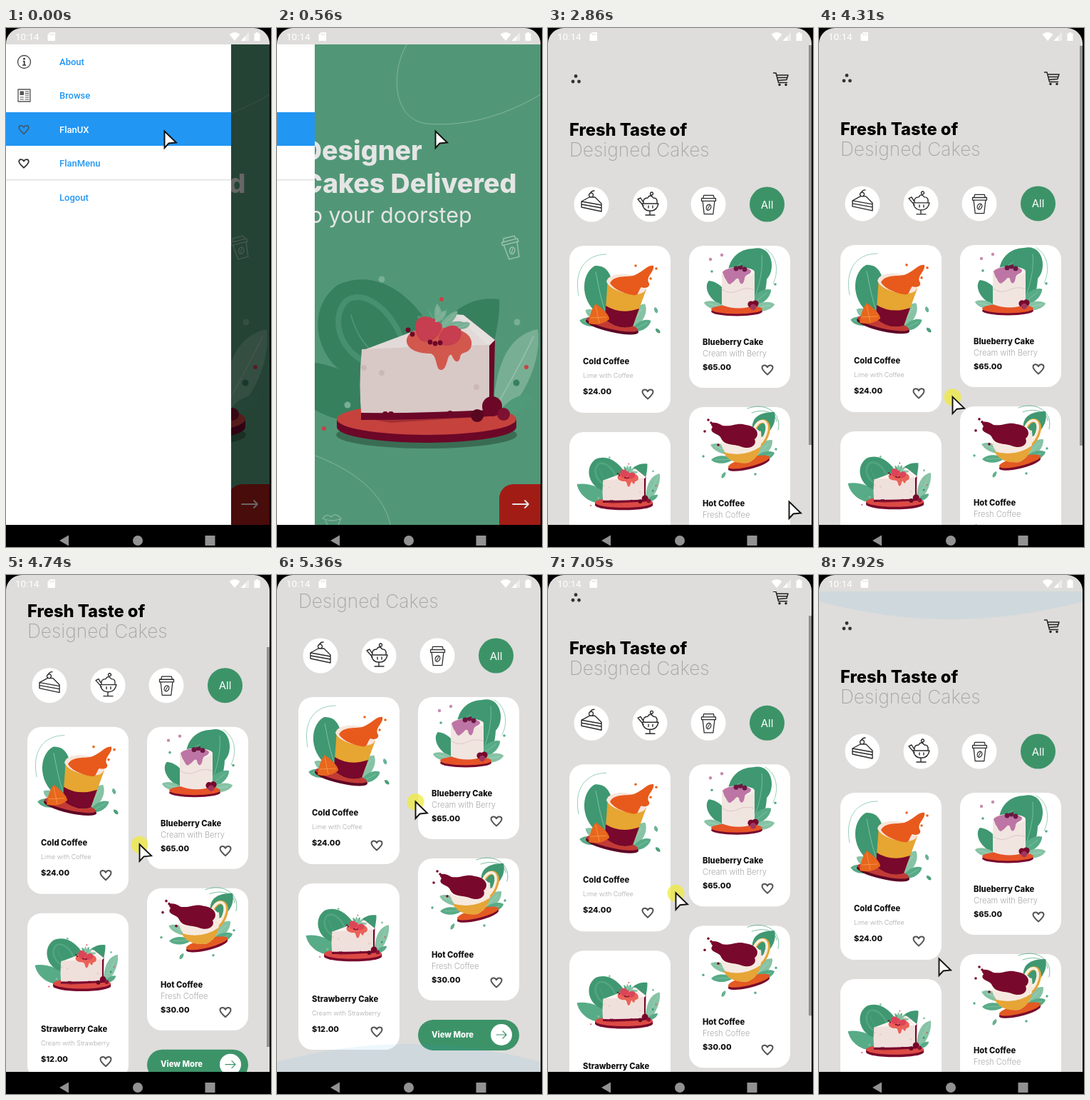
Recreate the animation shown at these times as an HTML page with a canvas. Size 372x727 px, loop 8000 ms.

```html
<!DOCTYPE html>
<html lang="en">
<head>
<meta charset="utf-8">
<title>Cake shop app</title>
<style>
html, body { margin: 0; width: 100%; height: 100%; overflow: hidden; background: #000; }
canvas { display: block; width: 372px; height: 727px; }
</style>
</head>
<body>
<canvas id="stage"></canvas>
<script>
const W = 372, H = 727, SCREEN = 370, TOP = 23, BOTTOM = 696, LOOP = 8000;
const canvas = document.getElementById('stage');
const g = canvas.getContext('2d');
const dpr = window.devicePixelRatio || 1;
canvas.width = W * dpr;
canvas.height = H * dpr;

const PAPER = '#dedddb', GREEN = '#3d9368', BLUE = '#2196f3', MAROON = '#78082c';
const LEAF = '#3f9871', MID = '#58ab87', PALE = '#86c3a5';
const GEO = 'Inter, "Open Sans", sans-serif', UI = 'Roboto, sans-serif';

// Drawing helpers
const fill = (d, c) => { g.fillStyle = c; g.fill(new Path2D(d)); };
const line = (d, c, w = 1) => {
  g.strokeStyle = c; g.lineWidth = w; g.lineCap = g.lineJoin = 'round';
  g.stroke(new Path2D(d));
};
const rect = (x, y, w, h, c) => { g.fillStyle = c; g.fillRect(x, y, w, h); };
const round = (x, y, w, h, r, c) => {
  g.fillStyle = c; g.beginPath(); g.roundRect(x, y, w, h, r); g.fill();
};
const oval = (x, y, rx, ry, c, rot = 0) => {
  g.fillStyle = c; g.beginPath(); g.ellipse(x, y, rx, ry, rot, 0, 7); g.fill();
};
const dot = (x, y, r, c) => oval(x, y, r, r, c);
const dots = (c, r, ...pts) => pts.forEach(([x, y]) => dot(x, y, r, c));
const text = (s, x, y, size, c, weight = 400, family = GEO, align = 'left') => {
  g.font = `${weight} ${size}px ${family}`;
  g.textAlign = align; g.fillStyle = c; g.fillText(s, x, y);
};
const at = (x, y, draw, scale = 1, rot = 0) => {
  g.save(); g.translate(x, y); g.rotate(rot); g.scale(scale, scale); draw(); g.restore();
};
const leaf = (x, y, len, wide, deg, c) => at(x, y, () => {
  fill(`M0 0C${len * .25} ${-wide} ${len * .8} ${-wide} ${len} 0C${len * .8} ${wide} ${len * .25} ${wide} 0 0Z`, c);
  line(`M0 0H${len * .8}`, 'rgba(255,255,255,.3)', .7);
}, 1, deg * Math.PI / 180);

// Timing helpers
const clamp = v => Math.min(1, Math.max(0, v));
const span = (t, a, b) => clamp((t - a) / (b - a));
const smooth = u => u * u * (3 - 2 * u);
const track = (t, keys, ease = u => u) => {
  let i = 0;
  while (i < keys.length - 2 && t >= keys[i + 1][0]) i++;
  const [a, b] = [keys[i], keys[i + 1]], u = ease(span(t, a[0], b[0]));
  return a.slice(1).map((v, k) => v + (b[k + 1] - v) * u);
};

const heart = (x, y, s = 1, c = '#555', w = 2) => at(x, y, () =>
  line('M0 6.5C-4 3-7.5 0-7.5-3.2C-7.5-7.3-2-7.8 0-3.8C2-7.8 7.5-7.3 7.5-3.2C7.5 0 4 3 0 6.5Z', c, w), s);

const arrow = (x, y, half, c, w) => line(`M${x - half} ${y}H${x + half}m-5-5l5 5l-5 5`, c, w);

// Illustrations
function slice(onGreen) {
  const deep = onGreen ? '#3c8e69' : LEAF;
  fill('M130 548C70 560 15 520 5 468C50 460 110 480 140 510Z', onGreen ? deep : MID);
  fill('M150 500C60 500 30 400 85 360C140 335 190 375 215 420L215 500Z', deep);
  line('M135 472C92 460 72 410 97 382C122 366 155 392 172 428', 'rgba(110,185,150,.4)', 8);
  line('M104 402C110 425 122 445 140 458', 'rgba(160,210,185,.35)', 1.5);
  fill('M235 425C240 395 275 375 312 380C314 405 304 440 298 480L240 470Z', deep);
  fill('M304 520C310 470 325 430 366 422C372 460 350 520 312 545Z', PALE);
  line('M308 530C325 500 345 465 360 432', 'rgba(255,255,255,.35)', 1.3);
  fill('M308 545C320 520 345 510 358 515C356 530 335 545 312 548Z', MID);
  if (onGreen) oval(210, 570, 127, 19, 'rgba(40,75,55,.5)');
  oval(210, 559, 126, 22, MAROON);
  rect(84, 548, 252, 11, MAROON);
  oval(210, 548, 126, 22, '#dc4a44');
  fill('M118 546L160 553L310 543L298 534Z', '#b7343a');
  fill('M250 403L262 402L306 437L304 528L297 540Z', MAROON);
  fill('M119 452L252 402L298 446Z', '#fbf3f0');
  fill('M250 401L262 402L306 437L297 446Z', '#fffaf7');
  fill('M119 450Q200 446 298 444V539L119 549Q114 500 119 450Z', '#f0e0dc');
  fill('M118 539Q200 540 298 535V544Q210 549 118 549Z', MAROON);
  dots('#e3cdc9', 4, [147, 483], [122, 476], [280, 503]);
  dots(MAROON, 4, [152, 541], [160, 541], [243, 540]);
  for (const a of [-150, -120, -95, -70, -45, -15]) leaf(228, 422, 36, 7, a, a % 2 ? PALE : MID);
  fill('M182 440C180 422 210 418 235 420C262 420 278 432 272 448C266 458 258 452 257 462C254 472 248 466 245 458C238 456 240 478 231 479C222 480 226 460 216 456C200 456 185 452 182 440Z', '#ea6257');
  fill('M196 410C203 400 220 404 232 416C230 432 215 444 202 438C194 430 192 418 196 410Z', '#dc4558');
  fill('M228 430C235 414 252 414 258 422C262 436 250 446 236 445C228 444 225 438 228 430Z', '#dc4558');
  leaf(222, 412, 22, 6, -45, PALE);
  leaf(254, 420, 18, 6, -20, PALE);
  dots(MAROON, 3.4, [184, 423], [190, 429], [215, 440], [222, 442], [229, 441]);
  dot(302, 530, 14, MAROON); dot(281, 543, 9, '#620824'); dot(318, 541, 9, '#8c1236');
  dots('#e0484f', 3, [231, 380], [350, 475], [66, 561]);
  dots(PALE, 4.5, [147, 352], [99, 528], [337, 412]);
  dot(336, 497, 4.5, deep);
}

function coldCoffee() {
  line('M43 375C36 340 52 317 82 317', '#7fc3a2', .8);
  fill('M76 404C45 388 44 345 66 333C92 331 94 365 90 400Z', LEAF);
  line('M80 396C72 372 70 355 67 342', '#8dccb0', .8);
  leaf(82, 412, 34, 9, -150, PALE);
  leaf(74, 414, 30, 8, -172, MID);
  leaf(114, 422, 42, 12, -58, PALE);
  leaf(118, 424, 30, 8, -28, MID);
  oval(90, 418, 38, 8, '#5d0626', .22);
  oval(90, 415, 37, 7, '#c23a35', .22);
  fill('M84 350L138 366L119 418Q98 424 80 408Z', '#e7a531');
  fill('M81 389Q102 402 128 393L119 418Q98 424 80 408Z', MAROON);
  fill('M82 355Q86 343 111 345Q138 350 138 365Q134 376 111 372Q86 366 82 355Z', '#f8e5dc');
  fill('M87 357C94 345 112 350 122 346C133 342 140 331 148 333C150 341 138 347 141 356C145 361 139 366 131 363C126 368 128 376 119 374C105 372 90 364 87 357Z', '#e75a1c');
  fill('M67 386Q86 400 86 408Q74 418 57 414Q59 396 67 386Z', '#e8661d');
  line('M67 390L72 413M60 406L82 405', '#f4a04a', .8);
  dots('#e8661d', 1.8, [152, 337], [144, 351], [123, 333]);
  leaf(150, 391, 9, 3, 70, MID);
  leaf(151, 421, 9, 3, 45, LEAF);
}

function blueberryCake() {
  line('M305 309C321 318 325 340 316 358', '#7fc3a2', .8);
  fill('M263 390C240 340 257 310 288 309C316 303 320 340 307 352C306 372 300 390 284 396Z', LEAF);
  line('M286 388C298 360 302 336 300 318', '#83c7a9', .8);
  fill('M250 392C222 381 219 360 226 354C242 356 254 370 256 392Z', LEAF);
  leaf(248, 392, 30, 7, -166, PALE);
  leaf(282, 390, 39, 10, -37, MID);
  leaf(285, 394, 34, 8, -12, PALE);
  oval(265, 397, 36, 6.5, MAROON);
  oval(265, 394, 36, 6.5, '#e65327');
  fill('M244 342V388Q268 397 290 388V342Z', '#f1e5e0');
  line('M244 366Q255 374 267 368T290 367', '#ddc8c6', 1);
  oval(267, 342, 23, 7, '#f9f0ed');
  fill('M245 342C251 334 278 333 285 340C285 346 278 344 276 350C275 361 269 361 268 352C264 348 263 355 258 357C253 363 251 353 248 350Z', '#bd75a5');
  dots('#6b1740', 3.4, [264, 337], [270, 335], [276, 338]);
  leaf(266, 333, 9, 3, -30, LEAF);
  dots(MAROON, 4.6, [285, 387], [291, 386]);
  dot(288, 391, 4.2, '#a03660');
  dots('#c88bad', 2.2, [228, 324], [244, 318]);
  dots(MID, 1.8, [319, 359], [230, 341]);
}

function hotCoffee() {
  line('M280 533C306 523 329 540 323 563', '#5aae88', .8);
  line('M286 539C306 532 320 540 321 551', '#5aae88', .8);
  fill('M287 566C284 546 296 538 318 538C322 555 310 570 294 576Z', LEAF);
  leaf(262, 596, 36, 8, -160, PALE);
  leaf(260, 604, 31, 7, 178, MID);
  leaf(288, 604, 38, 10, -45, PALE);
  leaf(288, 606, 32, 8, -20, MID);
  oval(282, 611, 30, 7, MAROON, -.24);
  oval(282, 608, 30, 6.5, '#e35a22', -.24);
  line('M290 562C296 546 311 548 309 564C306 578 298 586 288 589', '#e6a536', 5.5);
  line('M289 562C296 546 309 548 307 563C304 577 297 584 288 587', '#fbeee2', 3.6);
  fill('M240 574Q263 556 299 565Q303 599 281 609Q250 613 240 574Z', '#f6e9df');
  fill('M246 594Q274 603 299 586Q295 603 281 609Q256 612 246 594Z', '#e6a536');
  oval(268, 571, 29, 12, '#fffaf3', -.17);
  fill('M231 559C224 551 236 551 245 557C260 559 264 552 278 556C294 558 298 570 290 576C294 584 284 592 270 586C256 582 249 585 243 575C242 568 224 568 231 559Z', MAROON);
  dots(MAROON, 1.8, [225, 549], [229, 553], [220, 565], [239, 584]);
  leaf(249, 622, 10, 3, 120, MID);
  dots(MID, 1.7, [218, 600], [320, 590], [291, 625]);
}

const paperCup = (c, w) => {
  line('M-9.5-8H9.5V-4.5H-9.5ZM-7.5-8L-6.5-12H6.5L7.5-8M-8-4.5L-6 13H6L8-4.5', c, w);
  g.beginPath(); g.ellipse(0, 4, 3, 4, .4, 0, 7); g.stroke();
  line('M-1.5 6.5L1.5 1.5', c, w * .8);
};

// Screens
function welcome() {
  rect(0, TOP, SCREEN, BOTTOM - TOP, '#5aa885');
  const thin = 'rgba(215,238,226,.45)';
  line('M182 23C160 60 161 128 210 134C270 139 325 120 370 93', thin);
  line('M0 583C100 606 150 650 159 696', thin);
  at(329, 307, () => paperCup('rgba(225,242,232,.65)', 1.2), 1.2, -.25);
  at(78, 691, () => line('M-14-4Q-8-12-2-6Q4-13 12-4M-14-4Q0 2 12-4L7 7M-10-1L-6 8', thin, 1.3));
  text('Designer', 36, 185, 37.5, '#fff', 800);
  text('Cakes Delivered', 36, 231, 37.5, '#fff', 800);
  text('to your doorstep', 36, 273, 30.4, '#fff');
  slice(true);
  round(312, 639, 58, 57, [20, 0, 0, 0], '#b41f19');
  arrow(342, 667, 11, '#fff', 1.8);
}

function card(x, y, h, name, note, price, big) {
  round(x, y, 142, h, 20, '#fff');
  const [ny, sy, py] = big ? [166, 185, 208] : [139, 155, 174];
  text(name, x + 19, y + ny, 11.2, '#111', 800);
  text(note, x + 19, y + sy, big ? 9 : 11.1, '#a9a9a9', 300);
  text(price, x + 19, y + py, 11, '#111', 800);
  heart(x + 110, y + py, 1);
}

function shop(scroll) {
  rect(0, TOP, SCREEN, BOTTOM - TOP, PAPER);
  g.save();
  g.translate(0, -scroll);
  dots('#333', 2.4, [39, 67.5], [35, 75], [43.5, 75]);
  line('M316.5 63H320L323.5 76.5H335.5M321 66H337L335 72.5L322.5 73.5M322 69.5H336', '#222', 1.5);
  dots('#222', 1.7, [325, 79.5], [334, 79.5]);
  text('Fresh Taste of', 30, 151, 23.7, '#000', 800);
  text('Designed Cakes', 30, 180, 26.3, '#a6a6a6', 200);

  [61, 143, 225].forEach(x => dot(x, 247, 24.5, '#fff'));
  dot(307.5, 247, 24.5, GREEN);
  text('All', 307.5, 252.5, 15, '#fff', 400, GEO, 'center');
  const ink = '#2b2b2b';
  at(61, 246, () => line('M-14-3L-3-9H5L14 0V11L-14 5ZM-14-3L14 2M-14 1L14 6M-1-9A3 3 0 1 1 0-9M-2-14Q0-18 4-18', ink, 1.4));
  at(143, 247, () => line('M-11-1H12Q10 8 3 9H-2Q-9 8-11-1ZM0 9V14M-6 15H7M-9-2Q-10-9-3-9Q0-15 5-9Q11-9 10-2M-16-6L-9 2M-17-7L-13-9L-10-4M-2 2V5M4 2V5M2-13A2 2 0 1 1 3-13', ink, 1.4));
  at(225.5, 247, () => paperCup(ink, 1.2), 1.05);

  card(30, 305, 234, 'Cold Coffee', 'Lime with Coffee', '$24.00', true);
  coldCoffee();
  card(198, 305, 199, 'Blueberry Cake', 'Cream with Berry', '$65.00');
  blueberryCake();
  card(30, 566, 233, 'Strawberry Cake', 'Cream with Strawberry', '$12.00', true);
  at(66, 666, () => { g.translate(-84, -552); slice(false); }, .322);
  card(198, 531, 199, 'Hot Coffee', 'Fresh Coffee', '$30.00');
  hotCoffee();
  round(198, 757, 142, 43, 21.5, GREEN);
  text('View More', 217, 781.5, 11.2, '#fff', 800);
  dot(315, 778, 15, '#fff');
  arrow(315, 778, 7, GREEN, 1.2);
  g.restore();
}

function drawer() {
  rect(0, TOP, 316, BOTTOM - TOP, '#fff');
  rect(0, 118, 316, 47, BLUE);
  rect(0, 212, 316, 1.5, '#e2e2e2');
  ['About', 'Browse', 'FlanUX', 'FlanMenu', 'Logout'].forEach((s, i) =>
    text(s, 75, [52, 99, 146.5, 193.5, 242][i], 13, i === 2 ? '#fff' : BLUE, 500, UI));
  g.strokeStyle = '#444'; g.lineWidth = 1.3;
  g.beginPath(); g.arc(25.5, 47.5, 9, 0, 7); g.stroke();
  dot(25.5, 43.2, 1.4, '#333');
  line('M24.5 46.5H25.7V52M23.8 52H27.4', '#333', 1.7);
  line('M17 86H34V103H17Z', '#555', 1.3);
  rect(19.5, 88.5, 5.5, 5.5, '#555');
  line('M27 89H32M27 91.5H32M27 94H32M20 97H24.5M27 97H32M20 100H24.5M27 100H32', '#555', 1);
  heart(25, 142.5, .9, '#4b4b4b', 1.5);
  heart(25, 190, .9, '#333', 2);
}

function glow(edge, dir, a) {
  if (a <= 0) return;
  g.globalAlpha = a;
  fill(`M0 ${edge}V${edge + 14 * dir}Q185 ${edge + 64 * dir} 370 ${edge + 14 * dir}V${edge}Z`, BLUE);
  g.globalAlpha = 1;
}

function chrome() {
  rect(0, 0, SCREEN, TOP, PAPER);
  text('10:14', 13, 17, 13.5, '#fff', 400, UI);
  fill('M62 6H69V18H58.5V9.5Z', '#fff');
  line('M62.5 8V10M64.7 8V10M66.9 8V10', PAPER, 1);
  fill('M313.5 9Q321 3 328.5 9L321 18Z', '#fff');
  fill('M341 6V18H329.5Z', 'rgba(255,255,255,.45)');
  fill('M336 11.2V18H329.5Z', '#fff');
  fill('M348.5 7.5H351V6H354V7.5H356.5V18H348.5Z', '#fff');
  fill('M0 0H22A22 22 0 0 0 0 22ZM348 0H372V22H370A22 22 0 0 0 348 0Z', '#000');
  rect(SCREEN, 0, W - SCREEN, H, '#000');
  rect(0, BOTTOM, W, H - BOTTOM, '#000');
  fill('M75 718L88 710.5V725.5Z', '#929292');
  dot(185, 718, 7, '#929292');
  rect(279.5, 711, 14, 14, '#929292');
}

const PATH = [[0, 222, 143], [575, 222, 143], [1180, 331, 662], [1350, 341, 666], [1730, 341, 666],
  [1820, 340, 663], [2850, 340, 663], [2860, 338, 662], [3660, 172, 527], [4030, 187, 522], [4290, 187, 522]];
const DRAG_UP = [[4290, 187, 522], [4740, 187, 376], [5120, 194, 316], [5790, 194, 316], [5800, 194, 317], [6600, 194, 317]];
const DRAG_DOWN = [[6620, 194, 317], [7400, 168, 536]];
const PRESSES = [[140, 370], [1540, 1730], [4170, 5400], [6620, 7700]];
const SCROLL = [[4300, 0], [4400, 10], [4740, 92], [4860, 134], [6640, 134], [6780, 112], [7200, 0]];

function cursor(t) {
  const [x, y] = t < 4290 ? track(t, PATH, smooth) : t < 6620 ? track(t, DRAG_UP) : track(t, DRAG_DOWN, smooth);
  if (PRESSES.some(([a, b]) => t >= a && t < b)) dot(x + .5, y + 2, 12, 'rgba(240,234,55,.72)');
  at(x, y, () => {
    g.lineJoin = 'miter';
    const d = 'M.5 1.5V25L6.5 18.5L17 17.5Z';
    fill(d, '#fff');
    g.strokeStyle = '#111'; g.lineWidth = 1.9; g.stroke(new Path2D(d));
  });
}

function scrollBar(t, scroll) {
  const a = t < 4200 ? (t >= 2860 ? 1 - span(t, 3690, 4030) : 0)
    : t < 6000 ? (t >= 4310 ? 1 - span(t, 4970, 5090) : 0)
    : t >= 6650 ? 1 - span(t, 7670, 7900) : 0;
  if (a > 0) rect(366, 24 + scroll * .834, 4, 560, `rgba(100,100,100,${.62 * a})`);
}

function draw(t) {
  g.setTransform(dpr, 0, 0, dpr, 0, 0);
  g.clearRect(0, 0, W, H);
  g.save();
  g.beginPath(); g.rect(0, TOP, SCREEN, BOTTOM - TOP); g.clip();

  // The shop page slides in over the welcome page, which moves at half speed
  const slide = t < 1970 ? 0 : 1 - .5 * (1 - span(t, 1990, 2160)) ** 2;
  if (slide < 1) {
    at(-SCREEN * slide / 2, 0, welcome);
    const open = (1 - span(t, 385, 971)) ** 5;
    const dim = slide ? .34 * slide : .6 * open;
    if (dim > 0) rect(0, TOP, SCREEN, BOTTOM - TOP, `rgba(0,0,0,${dim})`);
    if (open > .001) at(-316 * (1 - open), 0, drawer);
  }
  if (slide > 0) {
    const [scroll] = track(t, SCROLL);
    at(SCREEN * (1 - slide), 0, () => shop(scroll));
    scrollBar(t, scroll);
    glow(BOTTOM, -1, .08 * span(t, 4900, 5150) * (1 - span(t, 5400, 5650)));
    glow(TOP, 1, .08 * span(t, 7220, 7500));
  }
  g.restore();
  chrome();
  cursor(t);
}

function frame() {
  draw(performance.now() % LOOP);
  requestAnimationFrame(frame);
}
frame();
</script>
</body>
</html>
```
